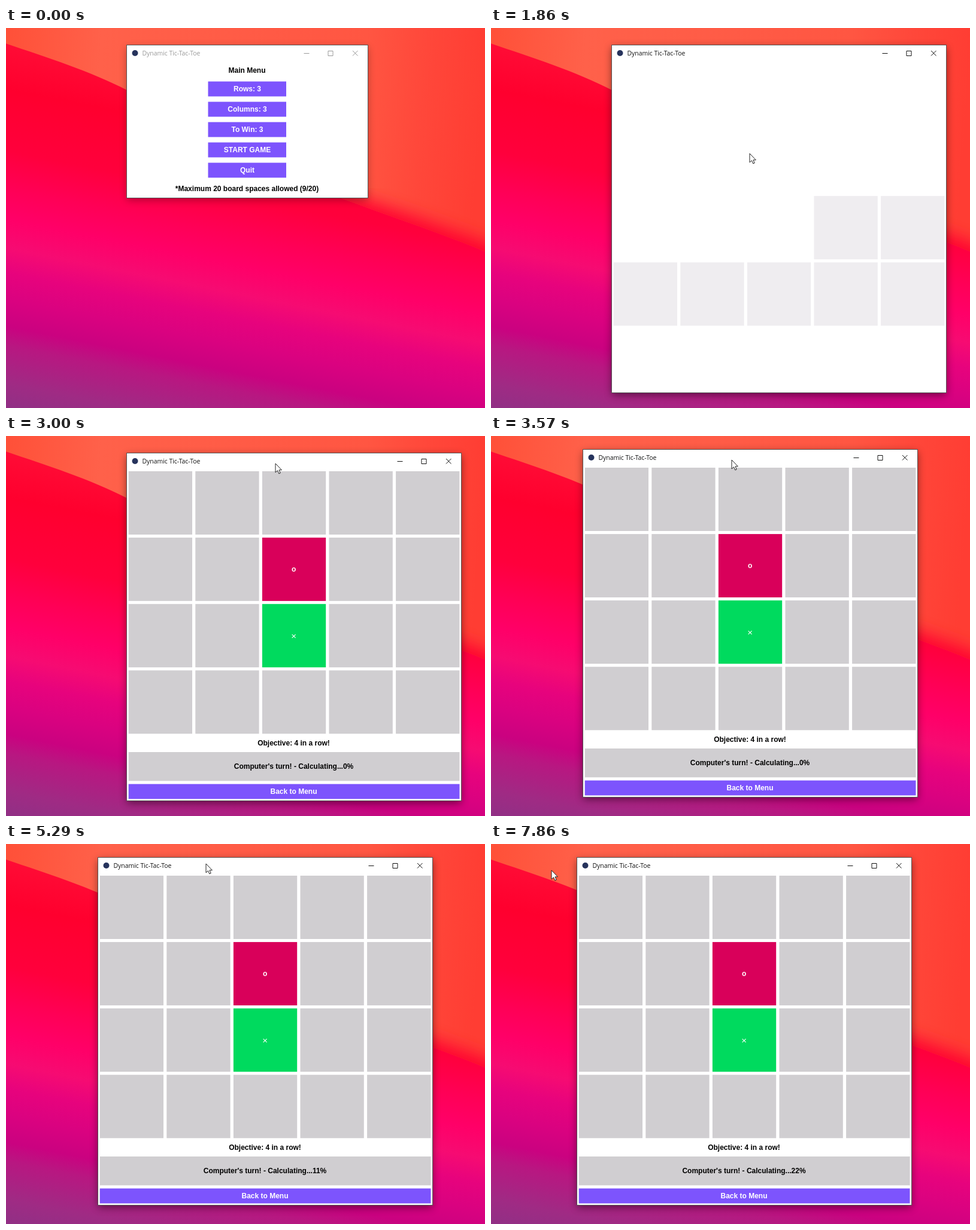
An HTML page for the animation above (8 s loop, 800 by 636 pixels).

```html
<!DOCTYPE html>
<html lang="en">
<head>
<meta charset="utf-8">
<title>Dynamic Tic-Tac-Toe</title>
<style>
  html, body { margin: 0; width: 100%; height: 100%; overflow: hidden; background: #ff0040; }
  svg { display: block; width: 100vw; height: 100vh; }
  .bold { font: bold 12px "Liberation Sans", Arial, sans-serif; text-anchor: middle; }
  .title { font: 10.4px "Open Sans", "Noto Sans", sans-serif; }
  .mark { font: 15px "Liberation Sans", Arial, sans-serif; text-anchor: middle; }
</style>
</head>
<body>
<svg viewBox="0 0 800 636">
  <defs>
    <linearGradient id="sea" gradientUnits="userSpaceOnUse" x1="0" y1="0" x2="-123" y2="615">
      <stop offset="0" stop-color="#ff1038"/>
      <stop offset=".16" stop-color="#ff002e"/>
      <stop offset=".32" stop-color="#ff003c"/>
      <stop offset=".42" stop-color="#ff0056"/>
      <stop offset=".5" stop-color="#ff0068"/>
      <stop offset=".575" stop-color="#f60b72"/>
      <stop offset=".64" stop-color="#e7037d"/>
      <stop offset=".71" stop-color="#da0280"/>
      <stop offset=".78" stop-color="#ca0280"/>
      <stop offset=".83" stop-color="#b81781"/>
      <stop offset=".93" stop-color="#9f2b84"/>
      <stop offset="1" stop-color="#8f3085"/>
    </linearGradient>
    <linearGradient id="sky" gradientUnits="userSpaceOnUse" x1="0" y1="0" x2="800" y2="60">
      <stop offset="0" stop-color="#ff5038"/>
      <stop offset=".2" stop-color="#ff614a"/>
      <stop offset=".75" stop-color="#ff5642"/>
      <stop offset=".88" stop-color="#ff473a"/>
      <stop offset="1" stop-color="#ff3d33"/>
    </linearGradient>
    <filter id="soft" x="-20%" y="-20%" width="140%" height="140%"><feGaussianBlur stdDeviation="14"/></filter>
    <filter id="shade" x="-10%" y="-10%" width="120%" height="120%"><feGaussianBlur stdDeviation="7"/></filter>
    <clipPath id="hill"><path d="M0 0V26C70 50 140 72 202 104C330 170 430 235 560 285C650 318 730 345 800 374V0Z"/></clipPath>
  </defs>
  <rect width="800" height="636" fill="url(#sea)"/>
  <g clip-path="url(#hill)">
    <rect width="800" height="636" fill="url(#sky)"/>
    <path d="M540 290C650 328 730 355 830 396" fill="none" stroke="#ff0033" stroke-width="44" filter="url(#soft)"/>
  </g>
  <g id="win"></g>
  <path id="cursor" d="M0 0V15L3.5 11.8L5.8 17L8.2 16L6 10.9H10.4Z" fill="#fff" stroke="#222" stroke-width="1"/>
</svg>
<script>
const LOOP = 8000, FPS = 7;
const PURPLE = '#7d54fd', GREY = '#d0ced1', PALE = '#efedf0', RED = '#d9005a', GREEN = '#00da5e';
const START = 12, PAINT = 13, BOARD = 14, O_MOVE = 15, X_MOVE = 18;

// Keyed by step: [step, value, ...]
const pointer = [
  [1, 470, 150], [2, 415, 104], [4, 413, 104], [5, 415, 138], [8, 415, 138],
  [9, 417, 172], [10, 417, 172], [12, 427, 206], [13, 432, 210], [17, 478, 320],
  [18, 479, 322], [21, 450, 46], [22, 450, 46], [25, 402, 40], [28, 402, 40],
  [37, 334, 33], [38, 334, 33], [40, 324, 33], [43, 121, 24], [46, 105, 40], [55, 101, 44]
];
const origin = [[22, 202, 29], [25, 154, 23], [38, 154, 23], [40, 144, 23]];
const progress = [[25, 0], [37, 11.01], [43, 17.01], [55, 22.01]];

function at(keys, k) {
  const i = keys.findIndex(p => p[0] > k);
  if (i === 0) return keys[0].slice(1);
  if (i < 0) return keys[keys.length - 1].slice(1);
  const a = keys[i - 1], b = keys[i], f = (k - a[0]) / (b[0] - a[0]);
  return a.slice(1).map((v, j) => v + (b[j + 1] - v) * f);
}

const rect = (x, y, w, h, fill) => `<rect x="${x}" y="${y}" width="${w}" height="${h}" fill="${fill}"/>`;
const text = (x, y, s, fill = '#000', cls = 'bold') => `<text x="${x}" y="${y}" fill="${fill}" class="${cls}">${s}</text>`;

function frame(w, h, active) {
  const ink = active ? '#111' : '#999';
  return `<rect x="0" y="4" width="${w}" height="${h}" filter="url(#shade)" opacity="${active ? .5 : .3}"/>`
    + `<rect x="-.5" y="-.5" width="${w + 1}" height="${h + 1}" fill="#fff" stroke="#555"/>`
    + '<circle cx="13.5" cy="13" r="5" fill="#26335c"/>'
    + text(25.5, 17.2, 'Dynamic Tic-Tac-Toe', ink, 'title')
    + `<path d="M${w - 106.5} 13.5h9M${w - 66} 9.5h8v8h-8zM${w - 25} 9l8.5 8.5m0-8.5l-8.5 8.5" fill="none" stroke="${ink}"/>`;
}

function menu(k) {
  const rows = k < 3 ? 3 : 4, cols = k < 6 ? 3 : k < 7 ? 4 : 5, goal = k < 9 ? 3 : 4;
  const labels = ['Rows: ' + rows, 'Columns: ' + cols, 'To Win: ' + goal, 'START GAME', 'Quit'];
  return frame(402, 255, k >= 3)
    + text(200.5, 46, 'Main Menu')
    + labels.map((s, i) => rect(135.5, 60.5 + 34 * i, 130.5, 25, PURPLE) + text(201, 77.3 + 34 * i, s, '#fff')).join('')
    + text(200.5, 244, `*Maximum 20 board spaces allowed (${rows * cols}/20)`);
}

function cell(r, c, k) {
  if (k < PAINT || (k === PAINT && r * 5 + c < 13)) return '';
  const isO = r === 1 && c === 2 && k >= O_MOVE, isX = r === 2 && c === 2 && k >= X_MOVE;
  const x = 2.7 + 111.6 * c, y = 30 + 111.1 * r;
  const fill = k === PAINT ? PALE : isO ? RED : isX ? GREEN : GREY;
  return rect(x, y, 106.3, 106, fill)
    + (isO ? text(x + 52.8, y + 57.3, 'o', '#fff') : '')
    + (isX ? text(x + 52.8, y + 59, '×', '#fff', 'mark') : '');
}

function game(k) {
  let s = frame(558, 581, true);
  for (let i = 0; i < 20; i++) s += cell(Math.floor(i / 5), i % 5, k);
  if (k < BOARD) return s;
  const status = k >= O_MOVE && k < X_MOVE ? 'Your turn!'
    : `Computer's turn! - Calculating...${Math.floor(at(progress, k)[0])}%`;
  return s + text(278.5, 489, 'Objective: 4 in a row!')
    + rect(2.7, 500, 552.8, 48.3, GREY) + text(278.5, 528.2, status)
    + rect(2.7, 553.5, 552.8, 25, PURPLE) + text(278.5, 570.3, 'Back to Menu', '#fff');
}

const win = document.getElementById('win'), cursor = document.getElementById('cursor');
let shown = -1;

function draw(ms) {
  const k = Math.floor(((ms % LOOP) + 5) * FPS / 1000) % (LOOP * FPS / 1000);
  if (k !== shown) {
    shown = k;
    win.setAttribute('transform', `translate(${at(origin, k).map(Math.round)})`);
    win.innerHTML = k < START ? menu(k) : game(k);
    cursor.setAttribute('transform', `translate(${at(pointer, k).map(Math.round)})`);
    cursor.style.display = k ? '' : 'none';
  }
}

const t0 = performance.now();
function tick() {
  draw(performance.now() - t0);
  requestAnimationFrame(tick);
}
tick();
</script>
</body>
</html>
```
